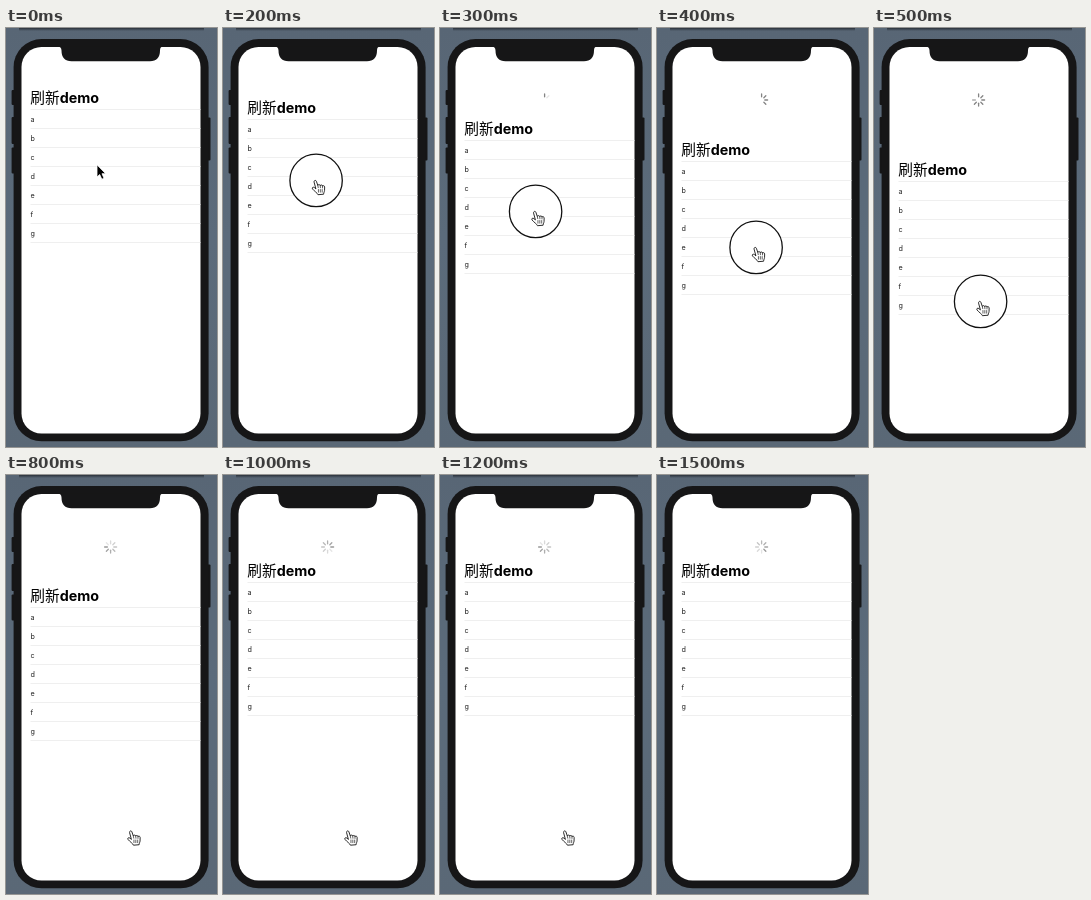
Animation, 211 px wide and 419 px high, one loop 1600 ms. Source, as an HTML page:

```html
<!DOCTYPE html>
<html lang="zh-CN">
<head>
<meta charset="utf-8">
<title>刷新demo</title>
<style>
  html, body { margin: 0; width: 100%; height: 100%; overflow: hidden; background: #5b6977; }
  svg { display: block; width: 100vw; height: 100vh; }
  text { font-family: Inter, "Noto Sans CJK SC", "Noto Sans CJK", sans-serif; }
  .title { font-size: 14.3px; font-weight: 700; fill: #000; }
  .han { font-family: "Noto Sans CJK SC", "Noto Sans CJK", sans-serif; font-size: 14.7px; font-weight: 500; }
  .row { font-size: 7.2px; fill: #222; }
  .rule { stroke: #ebebeb; stroke-width: .8; }
  .spoke { stroke: #777; stroke-width: 1.3; stroke-linecap: round; }
</style>
</head>
<body>
<svg viewBox="0 0 211 419" preserveAspectRatio="none">
  <defs>
    <linearGradient id="wall" x1="0" y1="0" x2="0" y2="1">
      <stop offset="0" stop-color="#586675"/>
      <stop offset=".5" stop-color="#5b6b7b"/>
      <stop offset="1" stop-color="#5a6876"/>
    </linearGradient>
    <linearGradient id="shade" x1="0" y1="0" x2="0" y2="1">
      <stop offset="0" stop-color="#2b323b"/>
      <stop offset="1" stop-color="#2b323b" stop-opacity="0"/>
    </linearGradient>
    <clipPath id="glass"><rect x="15.5" y="19" width="179" height="386.5" rx="20"/></clipPath>
  </defs>
  <rect width="211" height="419" fill="url(#wall)"/>
  <rect x="13" width="185" height="3" fill="url(#shade)"/>
  <g fill="#161617">
    <rect x="5.600" y="62" width="4" height="15" rx="1"/>
    <rect x="5.600" y="89" width="4" height="27" rx="1"/>
    <rect x="5.600" y="119.500" width="4" height="26" rx="1"/>
    <rect x="200.500" y="89.500" width="4" height="43" rx="1"/>
    <rect x="7.600" y="11" width="195" height="402.300" rx="28"/>
  </g>
  <rect x="15.500" y="19" width="179" height="386.500" rx="20" fill="#fff"/>
  <g clip-path="url(#glass)">
    <g id="spinner" transform="translate(104.600 72)"></g>
    <g id="list"><text class="title" x="24.300" y="74.700"><tspan class="han">刷新</tspan>demo</text></g>
  </g>
  <path fill="#161617" d="M51.500 18.500H157.500C155 18.500 154 20 154 22.500C154 29.500 150.500 33.300 144 33.300H65.500C59 33.300 55.500 29.500 55.500 22.500C55.500 20 54 18.500 51.500 18.500Z"/>
  <g id="pointer" stroke-linejoin="round" stroke-linecap="round">
    <circle id="press" cx="-.4" cy="-.6" r="26.200" fill="#fff" stroke="#111" stroke-width="1.300"/>
    <path id="arrow" fill="#000" stroke="#fff" stroke-width=".8" d="M0 0V12L2.700 9.500L4.800 14.200L7 13.200L5 8.700H8.500Z"/>
    <g id="hand" transform="translate(-.6 -.4) scale(.94)" fill="#fff" stroke="#111" stroke-width=".95">
      <path d="M-2 1.200C-2.200 -.4 0 -.8 .5 .7L2 5C2.600 3.900 4.400 4.100 4.600 5.200C5.400 4.300 6.900 4.600 7 5.700C8 5 9.400 5.600 9.300 6.800L9.200 10.500C9.100 12 8.300 12.600 8.200 14.500L2.200 15C1.500 13 -1.500 11.500 -3.500 9C-4.600 7.600 -3 6.400 -1.600 7.400L-.3 8.600Z"/>
      <path stroke-width=".7" d="M2 5L2.500 7.500M4.600 5.200L4.800 7.600M7 5.700V7.800M2.700 9.500V12.300M4.700 9.500V12.300M6.700 9.500V12.300"/>
    </g>
  </g>
</svg>
<script>
const $ = id => document.getElementById(id);
const STEP = 100, COUNT = 16, REST = 26, PITCH = 19;
const RELEASE = 7, LEAVE = 14;

// Pull distance and pointer position for each step of the drag.
const drag = [
  { pull: 0, x: 91, y: 137 },
  { pull: 2, x: 92, y: 142 },
  { pull: 10, x: 93.5, y: 153 },
  { pull: 31, x: 96, y: 184 },
  { pull: 52, x: 99.5, y: 220 },
  { pull: 72, x: 107, y: 274 },
  { pull: 90, x: 115.5, y: 327.5 }
];
const settle = [80, 51, 34];
const released = { x: 126, y: 356.5 };

function add(parent, tag, attrs, text = "") {
  const el = document.createElementNS("http://www.w3.org/2000/svg", tag);
  for (const key in attrs) el.setAttribute(key, attrs[key]);
  el.textContent = text;
  return parent.appendChild(el);
}

const rule = y => add($("list"), "line", { class: "rule", x1: 24.5, x2: 195, y1: y, y2: y });
rule(81.5);
[..."abcdefg"].forEach((letter, i) => {
  add($("list"), "text", { class: "row", x: 24.6, y: 93.7 + i * PITCH }, letter);
  rule(100.5 + i * PITCH);
});

const spokes = Array.from({ length: 8 }, (_, i) =>
  add($("spinner"), "line", { class: "spoke", y1: -3.2, y2: -6, transform: `rotate(${i * 45})` }));

const show = (id, on) => $(id).setAttribute("visibility", on ? "visible" : "hidden");
const move = (id, x, y) => $(id).setAttribute("transform", `translate(${x} ${y})`);
const clamp = v => Math.max(0, Math.min(1, v));

function spokeAlpha(i, step, pull) {
  if (step < RELEASE) return 0.9 * clamp((pull - 22) / 7.5 - i);
  const head = Math.round(2 + (step - 10) * 1.8);
  const age = ((head - i) % 8 + 8) % 8;
  return 0.75 - age * 0.08;
}

function draw(step) {
  const dragging = step < RELEASE;
  const pull = dragging ? drag[step].pull : settle[step - RELEASE] ?? REST;
  const at = dragging ? drag[step] : released;
  move("list", 0, pull);
  move("pointer", at.x, at.y);
  show("arrow", step === 0);
  show("press", dragging && step > 0);
  show("hand", step > 0 && step < LEAVE);
  spokes.forEach((el, i) => el.setAttribute("opacity", spokeAlpha(i, step, pull)));
}

const start = performance.now();
function tick() {
  draw(Math.floor((performance.now() - start) / STEP) % COUNT);
  requestAnimationFrame(tick);
}
tick();
</script>
</body>
</html>
```
